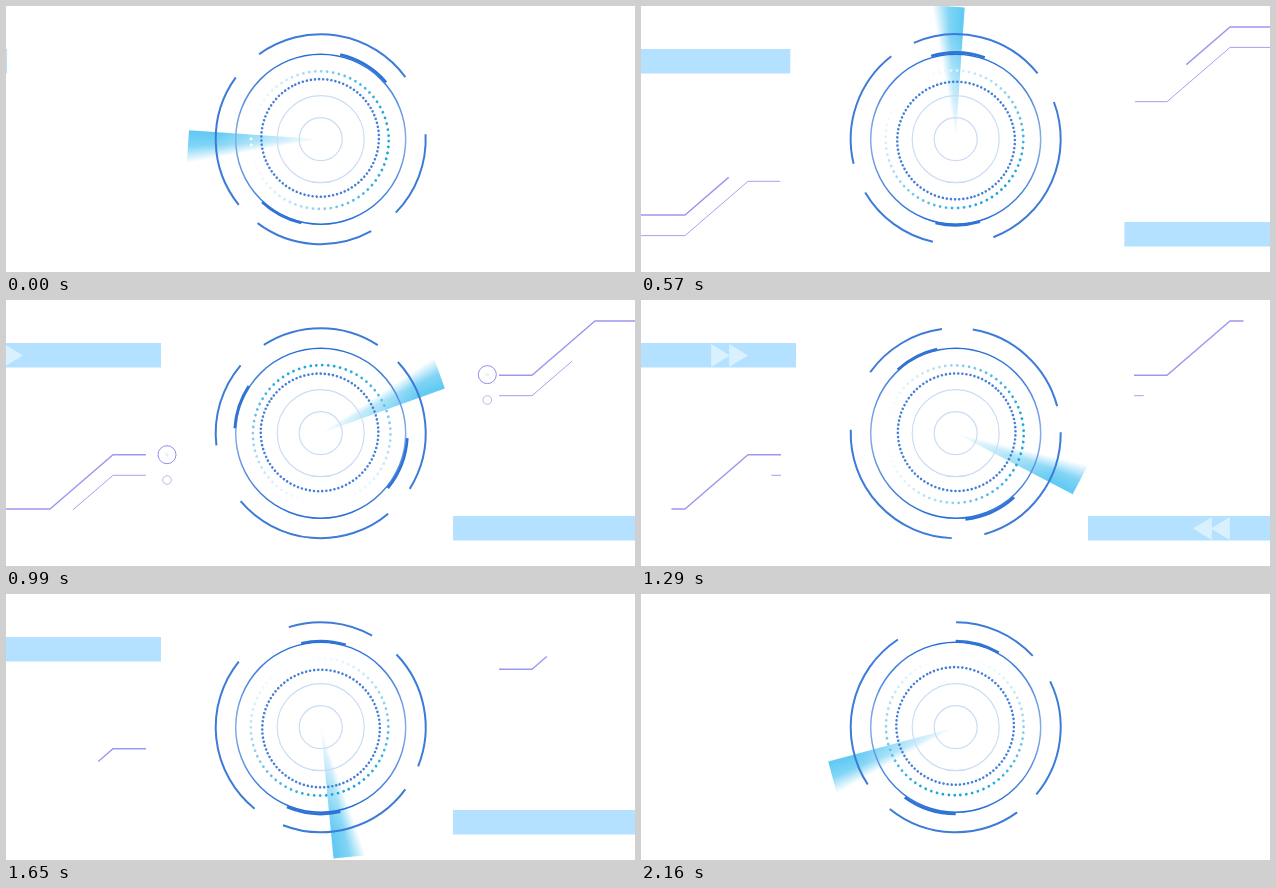
Write an HTML page with a canvas that moves like this. It is 629 px wide and 266 px high and loops after 2190 ms.

```html
<!DOCTYPE html>
<html lang="en">
<head>
<meta charset="utf-8">
<title>Radar HUD</title>
<style>
  html, body { margin: 0; width: 100%; height: 100%; overflow: hidden; background: #fff; }
  canvas { display: block; }
</style>
</head>
<body>
<canvas id="stage" width="629" height="266"></canvas>
<script>
const ctx = document.getElementById('stage').getContext('2d');
const LOOP = 2190, STEP = 30, CX = 314.7, CY = 133.2;
const TAU = Math.PI * 2, rad = deg => deg * Math.PI / 180;

const clamp = x => Math.min(1, Math.max(0, x));
const progress = (t, from, to) => clamp((t - from) / (to - from));
const smooth = (t, from, to) => { const s = progress(t, from, to); return s * s * (3 - 2 * s); };
const easeOut = (t, from, to) => 1 - (1 - progress(t, from, to)) ** 3;

// Smooth curve through [time, value] points, coming to rest at the last one.
function curve(points) {
  const last = points.length - 1;
  const gap = k => points[k + 1][0] - points[k][0];
  const rate = k => (points[k + 1][1] - points[k][1]) / gap(k);
  const inner = k => (rate(k - 1) * gap(k) + rate(k) * gap(k - 1)) / (gap(k - 1) + gap(k));
  const slope = k => k === 0 ? 2 * rate(0) - inner(1) : k === last ? 0 : inner(k);
  return t => {
    if (t >= points[last][0]) return points[last][1];
    let k = 0;
    while (t >= points[k + 1][0]) k++;
    const h = gap(k), s = (t - points[k][0]) / h, r = 1 - s;
    return points[k][1] * (1 + 2 * s) * r * r + slope(k) * h * s * r * r
      + points[k + 1][1] * s * s * (3 - 2 * s) - slope(k + 1) * h * s * s * r;
  };
}

const thickTurn = curve([[0, 283], [330, 504], [570, 613.6], [990, 723.3], [1290, 767.6], [1650, 796.9], [2160, 810]]);
const dotTurn = curve([[0, 0.8], [330, 244], [570, 407], [990, 625.5], [1290, 721.7], [1650, 789.5], [2160, 810]]);
const arcTurn = t => {
  const u = Math.min(t - 210, 1860);
  return 39 + 0.1863 * u - 1.75e-8 * u ** 3;
};

function arc(r, from, length, width, color) {
  ctx.beginPath();
  ctx.arc(0, 0, r, rad(from), rad(from + length));
  ctx.lineWidth = width;
  ctx.strokeStyle = color;
  ctx.stroke();
}

function isolated(draw) {
  ctx.save();
  draw();
  ctx.restore();
}

function dots(r, gap, size, turn, shift, shiftAngle, color) {
  isolated(() => {
    ctx.rotate(rad(turn));
    ctx.translate(shift * Math.cos(rad(shiftAngle)), shift * Math.sin(rad(shiftAngle)));
    ctx.lineCap = 'round';
    ctx.setLineDash([0.01, gap - 0.01]);
    arc(r, 0, 360, size, color);
  });
}

function shade(gradient, ...stops) {
  for (const [at, color] of stops) gradient.addColorStop(at, color);
  return gradient;
}

function beam(t) {
  const blue = alpha => `rgba(98,202,243,${alpha})`;
  isolated(() => {
    ctx.translate(CX, CY);
    ctx.rotate(rad(183.9 + t * 360 / 2280));
    ctx.fillStyle = shade(ctx.createConicGradient(rad(-20), 0, 0),
      [0, blue(0)], [6 / 360, blue(0)], [13 / 360, blue(0.8)], [19 / 360, blue(1)], [0.5, blue(1)], [0.5, blue(0)]);
    ctx.beginPath();
    ctx.moveTo(0, 0);
    ctx.lineTo(132, 0);
    ctx.lineTo(132, -33);
    ctx.fill();
    ctx.globalCompositeOperation = 'destination-in';
    ctx.fillStyle = shade(ctx.createRadialGradient(0, 0, 0, 0, 0, 105), [0, 'rgba(0,0,0,0)'], [1, '#000']);
    ctx.fillRect(-140, -140, 280, 280);
  });
}

function dial(t) {
  isolated(() => {
    ctx.translate(CX, CY);
    arc(21.5, 0, 360, 1.2, '#cbdcf5');
    arc(43.5, 0, 360, 1.2, '#cbdcf5');
    dots(58.8, TAU * 58.8 / 90, 2.6, 245 + t / 3, 1.4, 0, '#447fd9');
    dots(68.8, 6, 2.8, dotTurn(t), 1.2, 130,
      shade(ctx.createLinearGradient(-69, 0, 69, 0), [0, '#fff'], [1, '#18a4de']));

    arc(85, 0, 360, 1.5, shade(ctx.createLinearGradient(0, -85, 0, 85),
      [0, '#266dd6'], [0.5, '#86ade8'], [1, '#266dd6']));

    const thick = thickTurn(t);
    arc(86.7, thick, 36, 2.8, '#3073d6');
    arc(86, thick + 180, 30, 2.8, '#3073d6');

    const turn = arcTurn(t);
    for (const [from, length] of [[234, 89.7], [357.3, 47], [61.2, 65.7], [141.3, 74.7]])
      arc(105, from + turn, length, 2, '#3c7bd8');
  });
}

function bar(x, y, width, arrowTip, dir, t) {
  isolated(() => {
    ctx.beginPath();
    ctx.rect(x, y, width * dir, 24.6);
    ctx.fillStyle = '#b3e1ff';
    ctx.fill();
    ctx.clip();
    ctx.globalAlpha = 0.5 * (1 - progress(t, 1450, 1620));
    ctx.fillStyle = '#fff';
    for (const back of [0, 18]) {
      const tip = x + dir * (arrowTip - back);
      ctx.beginPath();
      ctx.moveTo(tip, y + 12.5);
      ctx.lineTo(tip - dir * 19, y + 1);
      ctx.lineTo(tip - dir * 19, y + 24);
      ctx.fill();
    }
  });
}

function bars(t) {
  const stay = 1 - smooth(t, 1690, 2130);
  bar(0, 43, 155 * easeOut(t, -2, 855) * stay, 0.3 * (t - 933), 1, t);
  bar(629, 216, 182 * easeOut(t, 222, 1060) * stay, 0.3 * (t - 1033), -1, t);
}

function trace(y, head, tail, width, color) {
  if (head - tail < 0.1) return;
  ctx.beginPath();
  ctx.moveTo(0, y);
  ctx.lineTo(44, y);
  ctx.lineTo(107, y - 54.3);
  ctx.lineTo(140, y - 54.3);
  ctx.setLineDash([head - tail, 999]);
  ctx.lineDashOffset = -tail;
  ctx.lineWidth = width;
  ctx.strokeStyle = color;
  ctx.stroke();
}

function traces(t) {
  const upper = [209, 160.2 * smooth(t, 32, 943), 160.2 * smooth(t, 993, 2058), 1.4, '#9b98f0'];
  const lower = [229.6, 160.2 * smooth(t, 15, 596), 160.2 * smooth(t, 608, 1410), 0.9, '#9a97f0'];
  for (const [line, sumY] of [[upper, 230], [lower, 271]]) {
    isolated(() => trace(...line));
    isolated(() => {
      ctx.transform(-1, 0, 0, -1, 633, sumY);
      trace(...line);
    });
  }
}

function nodes(t) {
  const alpha = smooth(t, 720, 900) * (1 - smooth(t, 1080, 1260));
  for (const [x, y, r, color] of [
    [161, 154.7, 9, '#8f8cee'], [161, 180, 4.3, '#b9b6f4'],
    [481.3, 74.6, 9, '#8f8cee'], [481.3, 100, 4.3, '#b9b6f4']
  ]) isolated(() => {
    ctx.globalAlpha = alpha;
    ctx.translate(x, y);
    arc(r, 0, 360, 1, color);
    if (r > 5) arc(1.2, 0, 360, 0.5, '#cfcdf8');
  });
}

let start;
function frame(now) {
  start ??= now;
  const t = Math.floor((now - start) % LOOP / STEP) * STEP;
  ctx.clearRect(0, 0, 629, 266);
  beam(t);
  bars(t);
  traces(t);
  nodes(t);
  dial(t);
  requestAnimationFrame(frame);
}
requestAnimationFrame(frame);
</script>
</body>
</html>
```
